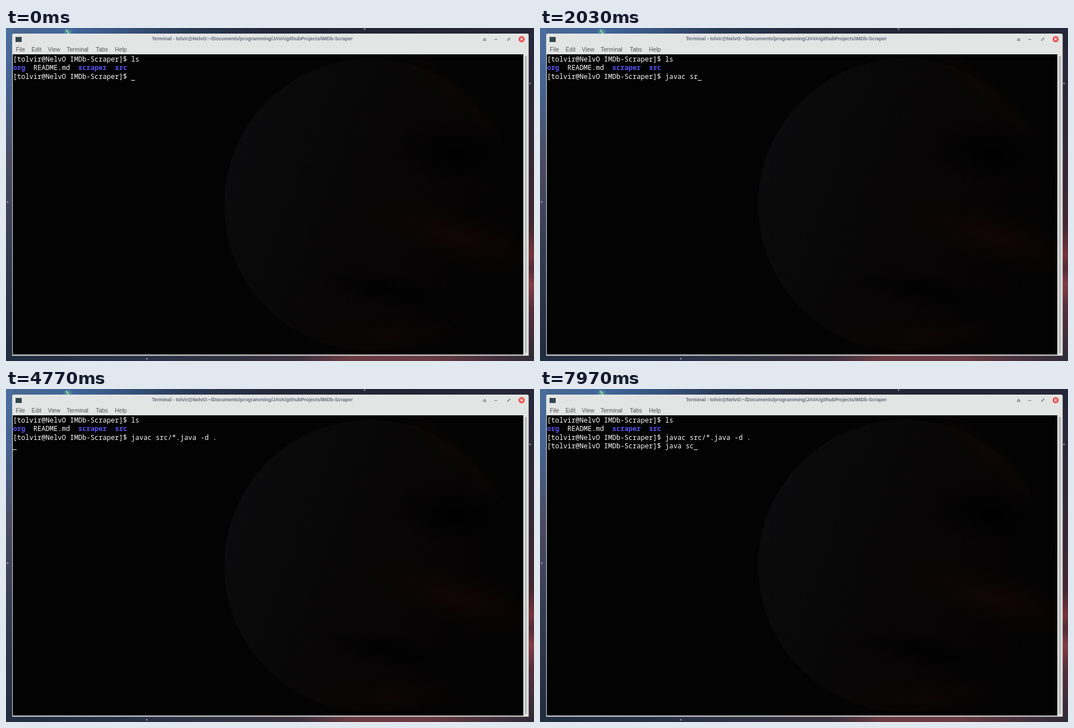
Write an HTML page with a canvas that moves like this. It is 941 by 595 pixels and loops after 8000 ms.

```html
<!DOCTYPE html>
<html lang="en">
<head>
<meta charset="utf-8">
<title>Terminal</title>
<style>
  html, body { margin: 0; width: 100%; height: 100%; overflow: hidden; background: #222636; }
  canvas { display: block; }
</style>
</head>
<body>
<canvas id="stage" width="941" height="595"></canvas>
<script>
const W = 941, H = 595, LOOP = 8000;
const ctx = document.getElementById('stage').getContext('2d');
const MONO = '12.12px "Noto Sans Mono", "DejaVu Sans Mono", monospace';
const SANS = '"Liberation Sans", Arial, sans-serif';
const CELL = 7.27, LEFT = 12.4, LINE = 15.2, BASE = 60.1;
const PROMPT = '[tolvir@NelvO IMDb-Scraper]$ ';
const TITLE = 'Terminal - tolvir@NelvO:~/Documents/programming/JAVA/githubProjects/IMDb-Scraper';
const WHITE = '#fafafa', BLUE = '#5a54f4';
const ENTER = 4600, DONE = 5700;

// Each burst of keys: text, time of the first key, time of the last key.
const COMPILE = [['javac sr', 1050, 1990], ['c/*.', 2150, 2990], ['java -d .', 3170, 4350]];
const RUN = [['java sc', 6950, 7900]];

function typed(bursts, t) {
  return bursts.map(([text, first, last]) => {
    if (t < first) return '';
    const step = (last - first) / (text.length - 1);
    return text.slice(0, Math.floor((t - first) / step + 1.001));
  }).join('');
}

function rect(x, y, w, h, fill) {
  ctx.fillStyle = fill;
  ctx.fillRect(x, y, w, h);
}

function linear(x0, y0, x1, y1, ...stops) {
  const g = ctx.createLinearGradient(x0, y0, x1, y1);
  stops.forEach(([at, color]) => g.addColorStop(at, color));
  return g;
}

function glow(x, y, rx, ry, rgb, alpha, tilt = 0) {
  ctx.save();
  ctx.translate(x, y);
  ctx.rotate(tilt);
  ctx.scale(rx, ry);
  const g = ctx.createRadialGradient(0, 0, 0, 0, 0, 1);
  g.addColorStop(0, `rgba(${rgb},${alpha})`);
  g.addColorStop(1, `rgba(${rgb},0)`);
  rect(-1, -1, 2, 2, g);
  ctx.restore();
}

function stroke(color, width, ...lines) {
  ctx.strokeStyle = color;
  ctx.lineWidth = width;
  ctx.beginPath();
  for (const [x0, y0, x1, y1] of lines) {
    ctx.moveTo(x0, y0);
    ctx.lineTo(x1, y1);
  }
  ctx.stroke();
}

function label(text, x, y, font, color, align = 'left') {
  ctx.font = font;
  ctx.fillStyle = color;
  ctx.textAlign = align;
  ctx.fillText(text, x, y);
}

function cells(text, col, row, color = WHITE, weight = 500) {
  label(text, LEFT + col * CELL, BASE + row * LINE, `${weight} ${MONO}`, color);
}

function drawDesktop() {
  rect(0, 0, W, H, '#262a3a');
  rect(0, 0, W, 12, linear(0, 0, W, 0, [0, '#4a688f'], [0.12, '#41659a'], [0.22, '#38557f'],
    [0.34, '#2b3b56'], [0.5, '#242a3a'], [0.75, '#222534'], [1, '#262838']));
  rect(0, 0, 12, H, linear(0, 0, 0, H, [0, '#4a6f9e'], [0.2, '#46608b'], [0.4, '#4a4b60'],
    [0.65, '#363d52'], [1, '#1f2a3a']));
  rect(930, 0, 11, H, linear(0, 0, 0, H, [0, '#24273a'], [0.3, '#302735'], [0.6, '#432731'],
    [0.68, '#75343b'], [0.72, '#512b35'], [0.77, '#813d45'], [0.84, '#55303c'], [1, '#302a36']));
  rect(0, 584, W, 11, linear(0, 0, W, 0, [0, '#212e40'], [0.3, '#2a3345'], [0.55, '#3a303d'],
    [0.65, '#6b3b42'], [0.8, '#693a41'], [0.88, '#50343e'], [1, '#2e2b38']));
  glow(110, 7, 9, 7, '120,220,160', 0.6);
  stroke('#a8e8a0', 1.5, [107, 3, 112, 10]);
  for (const [x, y] of [[639, 2], [934, 99], [251, 591], [3, 311]]) glow(x, y, 2, 2, '220,220,235', 0.9);
}

function drawWindow() {
  ctx.fillStyle = '#e3e5e4';
  ctx.beginPath();
  ctx.roundRect(11, 10, 920.5, 575.5, [3, 3, 0, 0]);
  ctx.fill();
  rect(17, 16, 11, 9, '#34464e');
  label(TITLE, 439, 22, `bold 8.65px ${SANS}`, '#666c80', 'center');

  const menu = { File: 17.5, Edit: 45.5, View: 74.5, Terminal: 108, Tabs: 160, Help: 194 };
  for (const name in menu) label(name, menu[name], 41.5, `10.3px ${SANS}`, '#505658');

  const ink = '#6b7073';
  stroke(ink, 1, [850, 22.5, 856, 22.5], [850.5, 20.5, 853, 18], [853, 18, 855.5, 20.5],
    [850.5, 20.5, 855.5, 20.5], [870.5, 20.5, 875.5, 20.5], [894, 22, 898, 18]);
  stroke(ink, 1, [896, 18, 898.5, 18], [898, 18, 898, 20.5], [893.5, 22, 896, 22], [894, 19.5, 894, 22]);
  ctx.fillStyle = '#ef5054';
  ctx.beginPath();
  ctx.arc(919, 20, 5.5, 0, 7);
  ctx.fill();
  stroke('#fff', 1.2, [917, 18, 921, 22], [921, 18, 917, 22]);

  rect(924.5, 50, 4, 531, '#b7bbba');
  rect(12, 47, 910, 536.5, '#030303');
}

function drawPlanet() {
  ctx.save();
  ctx.beginPath();
  ctx.rect(12, 47, 910, 536.5);
  ctx.clip();
  ctx.beginPath();
  ctx.arc(650, 316, 261, 0, 7);
  ctx.fillStyle = linear(389, 200, 911, 400, [0, '#0b0b0d'], [0.3, '#090808'], [0.6, '#070505'], [1, '#040303']);
  ctx.fill();
  glow(800, 225, 130, 55, '0,0,0', 0.8, 0.15);
  glow(690, 470, 160, 32, '0,0,0', 0.7, 0.2);
  glow(810, 375, 180, 45, '48,10,10', 0.28, 0.3);
  glow(790, 110, 130, 25, '36,12,10', 0.2, 0.7);
  glow(690, 550, 150, 30, '40,10,12', 0.2);
  ctx.restore();
}

function drawShell(t) {
  cells(PROMPT + 'ls', 0, 0);
  cells('org', 0, 1, BLUE, 'bold');
  cells('README.md', 5, 1);
  cells('scraper', 16, 1, BLUE, 'bold');
  cells('src', 25, 1, BLUE, 'bold');

  let row = 2, line = PROMPT + typed(COMPILE, t);
  cells(line, 0, row);
  if (t >= ENTER) {
    row = 3;
    line = t < DONE ? '' : PROMPT + typed(RUN, t);
    cells(line, 0, row);
  }
  rect(Math.round(LEFT + line.length * CELL), Math.round(BASE + row * LINE + 2.5), 7, 1, WHITE);
}

function draw(now) {
  drawDesktop();
  drawWindow();
  drawPlanet();
  drawShell(now % LOOP);
  requestAnimationFrame(draw);
}
draw(0);
</script>
</body>
</html>
```
